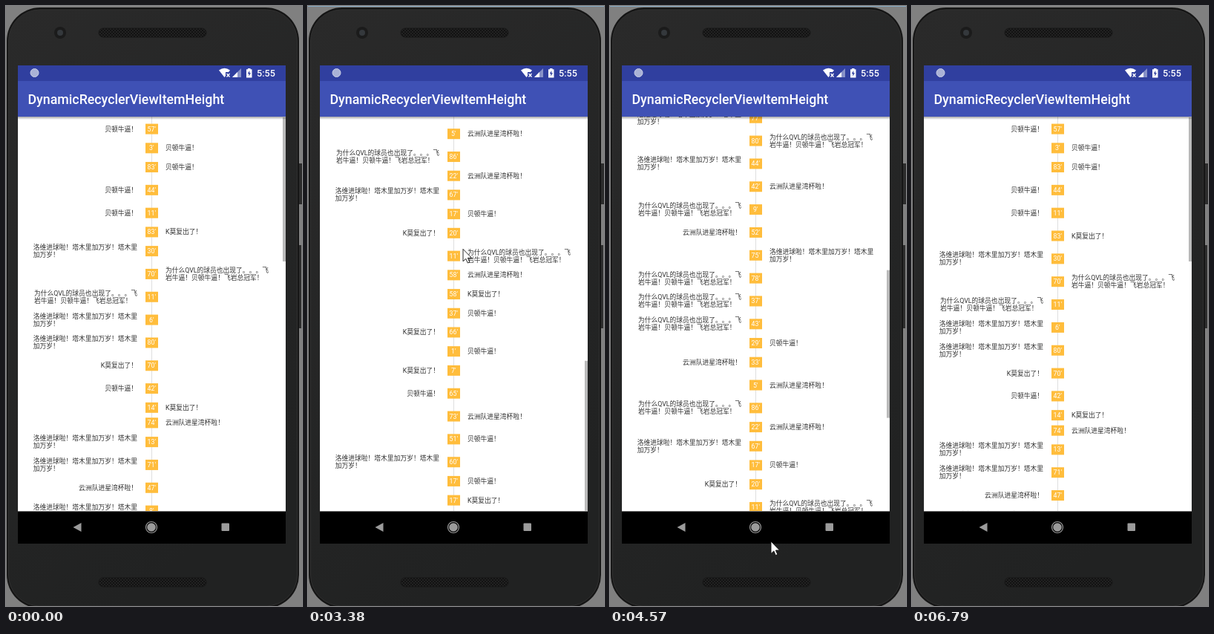
Animation, 399 px wide and 808 px high, one loop 6.86 s. Source, as an HTML page:

```html
<!DOCTYPE html>
<html lang="zh-CN">
<head>
<meta charset="utf-8">
<title>DynamicRecyclerViewItemHeight</title>
<style>
html, body { margin: 0; width: 100%; height: 100%; overflow: hidden; background: #808080; }
#stage { position: absolute; left: 0; top: 0; width: 399px; height: 808px; overflow: hidden; }
#stage > svg { position: absolute; left: 0; top: 0; }
svg text { font-family: Roboto, sans-serif; font-weight: 500; fill: #fff; }
#list {
  position: absolute; left: 16px; top: 149px; width: 361px; height: 531px;
  border-bottom: 1px solid #777;
  overflow: hidden; background: #fff; color: #303030;
  font: 8.78px/10px Roboto, "Noto Sans CJK SC", "Noto Sans CJK", sans-serif;
  white-space: nowrap; text-spacing-trim: space-all;
}
#list::before { content: ""; position: absolute; left: 179.5px; top: 0; width: 1px; height: 100%; background: #dedede; }
.row { position: absolute; left: 0; width: 100%; height: 0; }
.row b {
  position: absolute; left: 172px; top: -7px; width: 16.5px; height: 14px;
  font-weight: 400; line-height: 14px; text-align: center; color: #fff; background: #ffbd3c;
}
.row span { position: absolute; transform: translateY(-50%); }
.L { right: 200px; }
.R { left: 199px; }
#bar { position: absolute; right: 0; top: 1px; width: 4px; background: rgba(0, 0, 0, .27); }
.glow { position: absolute; left: -415.5px; top: 0; width: 1192px; height: 1192px; border-radius: 50%; background: #3f51b5; }
#shade { position: absolute; width: 100%; height: 4px; background: linear-gradient(rgba(0, 0, 0, .35), transparent); }
#line { position: absolute; width: 100%; height: 1px; background: #86a9c3; }
</style>
</head>
<body>
<div id="stage">
  <svg width="399" height="808">
    <defs>
      <linearGradient id="face" x2=".4" y2="1">
        <stop offset="0" stop-color="#2a2a2a"/><stop offset="1" stop-color="#212222"/>
      </linearGradient>
      <pattern id="mesh" width="4" height="4" patternUnits="userSpaceOnUse">
        <rect width="4" height="4" fill="#222"/>
        <circle cx="1" cy="1" r="1" fill="#0c0c0c"/><circle cx="3" cy="3" r="1" fill="#0c0c0c"/>
      </pattern>
    </defs>
    <rect width="399" height="808" fill="#808080"/>
    <path d="M394 212h5v55h-5zM394 322h4v112h-4z" fill="#2c2c2c"/>
    <rect x="1" y="2" width="394" height="809" rx="45" fill="#151515"/>
    <rect x="3.500" y="5" width="389" height="803" rx="42" fill="url(#face)" stroke="#303030"/>
    <circle cx="73" cy="36" r="8" fill="#1b1b1b"/>
    <circle cx="73" cy="36" r="4" fill="#34383c"/>
    <rect x="125" y="30" width="145" height="12" rx="6" fill="url(#mesh)" stroke="#171717"/>
    <rect x="125" y="770" width="145" height="12" rx="6" fill="url(#mesh)" stroke="#171717"/>

    <rect x="16" y="80" width="361" height="21" fill="#303f9f"/>
    <rect x="16" y="101" width="361" height="49" fill="#3f51b5"/>
    <circle cx="38.500" cy="90" r="5.500" fill="#aab2d6" stroke="#c9cee6"/>
    <path d="M287 86.500Q294.500 81 302 86.500L294.500 96z" fill="#fff"/>
    <path d="M296 89h7v8h-7z" fill="#303f9f"/>
    <path d="M297.500 91l4 4.500m0-4.500l-4 4.500" stroke="#fff" stroke-width="1.300"/>
    <path d="M305 96h12V84z" fill="#8791c7"/>
    <path d="M305 96h7v-7z" fill="#fff"/>
    <path d="M324 85.300h2v-1.300h3.500v1.300h2V96.500h-7.500z" fill="#fff"/>
    <path d="M328.300 87l-2.600 4.200h1.700v3.300l2.600-4.200h-1.700z" fill="#303f9f"/>
    <text x="338" y="95" font-size="12.6">5:55</text>
    <text x="29.500" y="132" font-size="17.8">DynamicRecyclerViewItemHeight</text>

    <rect x="16" y="681" width="361" height="43"/>
    <g fill="#9b9b9b">
      <path d="M90.500 702l11-6v12z"/>
      <circle cx="196" cy="702" r="5.800"/>
      <circle cx="196" cy="702" r="7.500" fill="none" stroke="#9b9b9b" stroke-width="1.200"/>
      <rect x="290.500" y="696.500" width="10.500" height="10.500" rx="1"/>
    </g>
  </svg>
  <div id="list">
    <div id="bar"></div>
    <div class="glow" id="low"></div>
    <div class="glow" id="high"></div>
    <div id="shade"></div>
  </div>
  <div id="line"></div>
  <svg width="399" height="808">
    <path id="cursor" d="M0 0V16.500L3.800 13L6.300 18.700L8.800 17.600L6.400 12H11.600z" fill="#fff" stroke="#111" stroke-width=".9"/>
  </svg>
</div>
<script>
const LOOP = 6860, TALL = 30.84, SHORT = 20.56, MAX_SCROLL = 909;
const phrases = {
  a: '贝顿牛逼!',
  b: 'K莫复出了!',
  c: '洛维进球啦!塔木里加万岁!塔木里<br>加万岁!',
  d: '为什么QVL的球员也出现了。。。飞<br>岩牛逼!贝顿牛逼!飞岩总冠军!',
  e: '云洲队进星湾杯啦!'
};
// minute, side, phrase; "-" marks a short row, "~" one that is short until recycled
const items = `57La 3Ra- 83Ra 44La 11La 83Rb~ 30Lc 70Rd 11Ld 6Lc 80Lc 70Lb 42La 14Rb- 74Re- 13Lc 71Lc
47Le 8Lc 77Lc 80Rd 44Lc 42Re 9Ld 52Le 75Rc 78Ld 37Ld 43Ld 29Ra- 33Le 5Re 86Ld 22Re- 67Lc 17Ra-
20Lb 11Rd 58Re- 58Rb 37Ra- 66Lb 1Ra- 7Lb 65La 73Re 51Ra 60Lc 17Ra- 17Rb`.split(/\s+/);

const $ = id => document.getElementById(id);
const rows = items.map(item => {
  const [, minute, side, phrase, mark] = item.match(/(\d+)([LR])(\w)(.?)/);
  const el = document.createElement('div');
  el.className = 'row';
  el.innerHTML = `<b>${minute}'</b><span class="${side}">${phrases[phrase].replace(/!/g, '\uff01')}</span>`;
  $('list').insertBefore(el, $('bar'));
  return { el, mark };
});

const out = n => p => 1 - (1 - p) ** n;
const both = n => p => p < .5 ? (2 * p) ** n / 2 : 1 - (2 - 2 * p) ** n / 2;

// each move: start, end, easing, values reached
const scrollMoves = [
  [1440, 2070, both(4.7), MAX_SCROLL],
  [3380, 4390, out(1.93), 570],
  [4800, 5930, out(1.53), 0]
];
const cursorMoves = [
  [120, 580, out(1.5), 225, 635],
  [1440, 1900, both(3.9), 217, 308],
  [2150, 2530, both(3.4), 198, 419],
  [2700, 3080, both(2), 209, 327],
  [3380, 4020, both(1.1), 217, 721],
  [4570, 4800, both(2), 230, 400],
  [4800, 5470, both(1.2), 324, 689],
  [5470, 6160, both(1.2), 336, 812]
];

const progress = (t, start, end) => Math.min(1, Math.max(0, (t - start) / (end - start)));
const pulse = (t, start, end) => Math.sin(Math.PI * progress(t, start, end));

function follow(moves, t, from) {
  return moves.reduce((pos, [start, end, ease, ...to]) => {
    const p = ease(progress(t, start, end));
    return pos.map((v, i) => v + (to[i] - v) * p);
  }, from);
}

function moveY(el, y) {
  el.style.transform = `translateY(${y}px)`;
}

function draw(now) {
  const t = now % LOOP, recycled = t > 1800;
  const [scroll] = follow(scrollMoves, t, [0]);
  let top = 1.2 - scroll;
  for (const { el, mark } of rows) {
    const height = mark === '-' || mark === '~' && !recycled ? SHORT : TALL;
    moveY(el, top + height / 2);
    top += height;
  }

  const part = scroll / MAX_SCROLL;
  $('bar').style.height = 194 + 8 * part + 'px';
  moveY($('bar'), 328 * part);

  const low = pulse(t, 2070, 2530), high = pulse(t, 5900, 6160) / 2;
  $('low').style.opacity = low * .1;
  $('high').style.opacity = high * .1;
  moveY($('low'), 532 - 37 * low);
  moveY($('high'), 37 * high - 1192);

  const [x, y] = follow(cursorMoves, t, [316, 812]);
  $('cursor').setAttribute('transform', `translate(${x} ${y})`);
  $('line').style.opacity = t >= 1210 && t < 6790 ? 1 : 0;
  requestAnimationFrame(draw);
}
draw(0);
</script>
</body>
</html>
```
